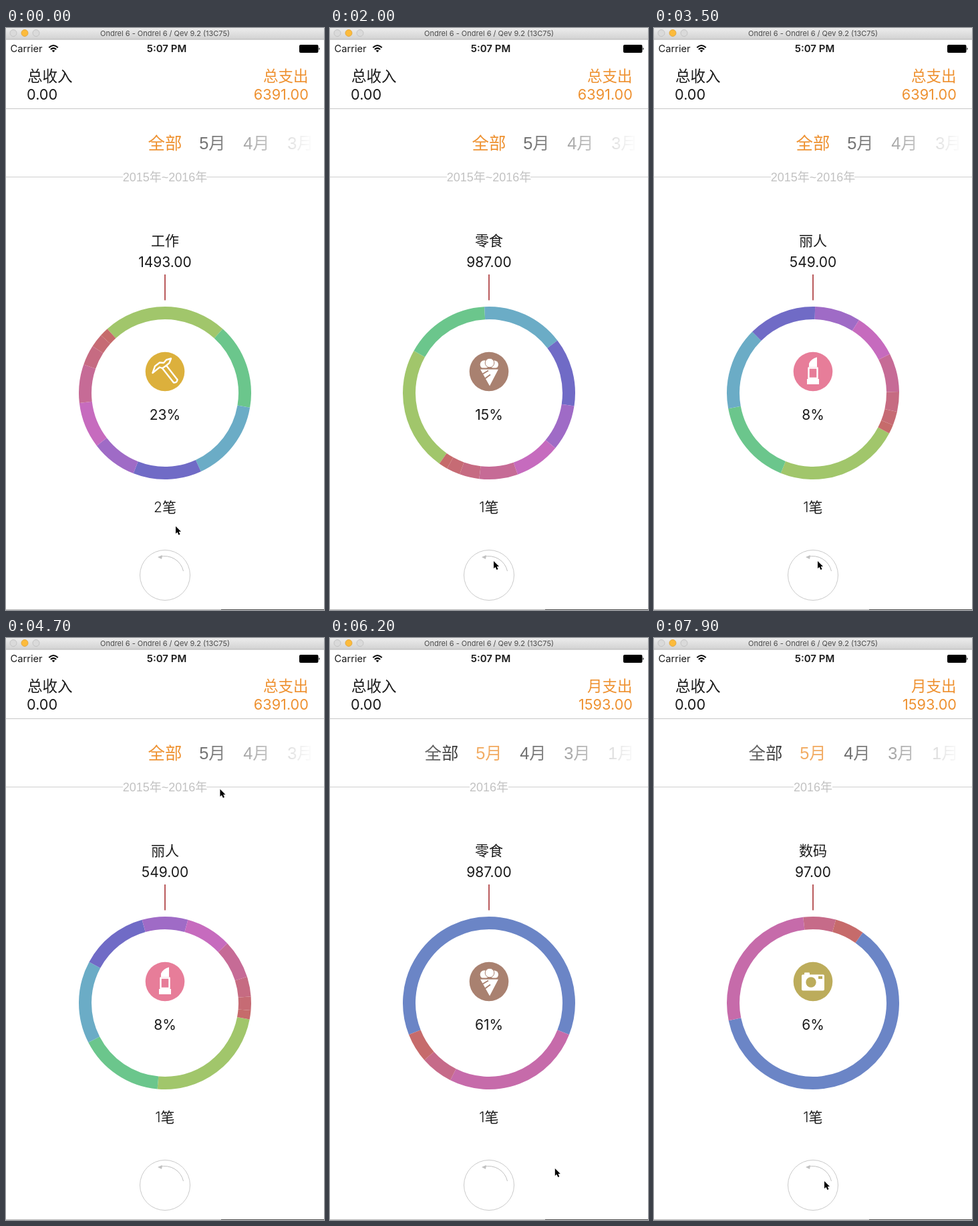
Recreate the animation shown at these times as an HTML page. Size 476 by 869 pixels, loop 8000 ms.

```html
<!DOCTYPE html>
<html lang="zh">
<head>
<meta charset="utf-8">
<title>Expense ring</title>
<style>
html, body { margin: 0; width: 100%; height: 100%; overflow: hidden; background: #fff; }
svg { display: block; width: 100%; height: 100%; }
text { font-family: Inter, "Noto Sans CJK SC", "Noto Sans CJK", sans-serif; fill: #1a1a1a; white-space: pre; }
.mid { text-anchor: middle; }
.end { text-anchor: end; }
.head { font-size: 21.7px; }
.zh { font-size: 22.5px; font-weight: 300; }
.orange { fill: #ee9130; }
.info { font-size: 21px; text-anchor: middle; }
.month, .year { font-family: "Liberation Sans", "Noto Sans CJK SC", "Noto Sans CJK", sans-serif; font-weight: 300; text-anchor: middle; }
.month { font-size: 25.4px; opacity: .75; }
.month:first-child { opacity: 1; }
.year { font-size: 18px; fill: #c2c2c2; }
.white { fill: #fff; }
.hollow { fill: none; stroke: #fff; stroke-width: 2.4; stroke-linejoin: round; stroke-linecap: round; }
</style>
</head>
<body>
<svg viewBox="0 0 476 869" xmlns="http://www.w3.org/2000/svg">
  <defs>
    <linearGradient id="bar" x2="0" y2="1">
      <stop stop-color="#ececec"/><stop offset="1" stop-color="#d2d2d2"/>
    </linearGradient>
    <linearGradient id="fade" gradientUnits="userSpaceOnUse" x1="16" x2="460" y1="0" y2="0">
      <stop stop-color="#fff" stop-opacity="0"/>
      <stop offset=".45" stop-color="#fff"/><stop offset=".55" stop-color="#fff"/>
      <stop offset="1" stop-color="#fff" stop-opacity="0"/>
    </linearGradient>
    <mask id="sides" maskUnits="userSpaceOnUse" x="0" y="140" width="476" height="60">
      <rect x="16" y="140" width="444" height="60" fill="url(#fade)"/>
    </mask>
  </defs>

  <!-- window and status bars -->
  <rect width="476" height="17" fill="url(#bar)"/>
  <path d="M0 17H476" stroke="#b4b4b4"/>
  <g stroke-width=".8">
    <circle cx="11" cy="7.5" r="5" fill="#dadada" stroke="#bcbcbc"/>
    <circle cx="28" cy="7.5" r="5" fill="#fcbb3c" stroke="#dd9f31"/>
    <circle cx="45" cy="7.5" r="5" fill="#dadada" stroke="#bcbcbc"/>
  </g>
  <text class="mid" x="238" y="12" font-size="11" style="fill:#4a4a4a">Ondrel 6 - Ondrel 6 / Qev 9.2 (13C75)</text>
  <text x="6.5" y="36.3" font-size="14.7">Carrier</text>
  <g fill="none" stroke="#000" stroke-width="2">
    <path d="M64.3 29.2Q71 22.8 77.7 29.2M66.8 32Q71 28.2 75.2 32"/>
    <path d="M71 36.3L68.6 33.8Q71 32 73.4 33.8Z" fill="#000" stroke="none"/>
  </g>
  <text class="mid" x="240.5" y="36.3" font-size="15" font-weight="600">5:07 PM</text>
  <rect x="439" y="25" width="28.5" height="12" rx="2"/>
  <path d="M468.4 29q2.4 2 0 4z"/>

  <!-- totals -->
  <text class="zh" x="32" y="80">总收入</text>
  <text class="head" x="31" y="106.5">0.00</text>
  <text class="zh end orange" id="outName" x="452.5" y="80"></text>
  <text class="head end orange" id="outSum" x="453" y="106.5"></text>
  <path d="M0 120.5H476" stroke="#c9c9c9"/>

  <g mask="url(#sides)"><g id="months"></g></g>
  <path id="rule" stroke="#cfcfcf"/>
  <text class="year" id="year" x="238" y="229"></text>

  <!-- chart -->
  <text class="info" id="name" x="238" y="324.8" font-weight="300"></text>
  <text class="info" id="sum" x="238" y="357"></text>
  <path d="M238 368V406.5" stroke="#b2484a" stroke-width="1.8"/>
  <g id="rings" fill="none" stroke-width="19"></g>
  <circle id="disc" cx="238" cy="513" r="29.3"/>
  <g id="icon"></g>
  <text class="info" id="share" x="238" y="584.5"></text>
  <text class="info" id="count" x="238" y="723" font-weight="300"></text>

  <!-- button -->
  <circle id="button" cx="238" cy="817" r="37.5"/>
  <g id="turn">
    <path d="M265.5 811A28.5 28.5 0 0 0 230 789.7" fill="none" stroke="currentColor"/>
    <path d="M227 790l7-3-1 6z" fill="currentColor"/>
  </g>

  <path d="M0 868.5H322" stroke="#b5b5b5"/>
  <path d="M322 868.5H476" stroke="#4a4a4a"/>
  <path id="cursor" d="M0 0V11L2.5 8.8 4.5 13 6.5 12.1 4.7 8H8Z" stroke="#fff" paint-order="stroke"/>
</svg>

<script>
const LOOP = 8000, SWITCH = 5200, TURN = 345, CX = 238, CY = 545, R = 119.5;
const $ = id => document.getElementById(id);

const icons = {
  pick: ['#dcb03c', `<g class="hollow"><path d="M219.5 515L223 505 230 499.5 236 500 240 495.5 247 493.5 244.5 500 240 504 234 508 230 506.5Z"/>
    <path d="M234 508L251 529.5Q256 530 256.5 525L240 504"/></g>`],
  bowl: ['#7fb2a0', '<path class="white" d="M221 511H255Q254 526 244 529H232Q222 526 221 511Z"/>'],
  cone: ['#a98170', `<g class="white"><circle cx="231" cy="502.5" r="6.3"/><circle cx="246" cy="502.5" r="6"/>
    <circle cx="239" cy="500" r="6.8" stroke="#a98170"/><path d="M225 509.5H252L239 534.5Z"/></g>
    <path d="M224 508.5H253M226 518L237 511.5M230 525L240 517.5" stroke="#a98170" stroke-width="2"/>`],
  bag: ['#d39a63', '<path class="white" d="M224 506H252L254 529H222Z"/><path class="hollow" d="M231 506Q231 497 238 497T245 506"/>'],
  lipstick: ['#e77d99', `<g class="white"><path d="M232 506V501Q235 494 244 491.5V506Z"/><path d="M229 524H247V532H229Z"/></g>
    <path class="hollow" d="M231.5 507.5H244.5V523H231.5Z"/>`],
  camera: ['#bcac5b', `<g class="white"><rect x="221" y="502.5" width="34" height="24" rx="2"/><rect x="225" y="499.5" width="8" height="5" rx="1"/></g>
    <g fill="#bcac5b"><circle cx="235" cy="514" r="7.7"/><rect x="246" y="505" width="6" height="4"/></g>`]
};

const sets = [
  { out: '总支出', year: '2015年~2016年', gap: [175, 300],
    values: [1493, 1024, 987, 820, 549, 548, 461, 238, 164, 107],
    items: [['工作', 'pick', 2], ['餐饮', 'bowl', 2], ['零食', 'cone', 1], ['购物', 'bag', 1], ['丽人', 'lipstick', 1]] },
  { out: '月支出', year: '2016年', gap: [209, 267],
    values: [987, 421, 97, 88],
    items: [['零食', 'cone', 1], ['餐饮', 'bowl', 1], ['数码', 'camera', 1]] }
];

// press time, release time, head start of the turn
const taps = [[800, 1200, 86], [1800, 1900, 86], [2500, 2600, 86],
  [3300, 3500, 186], [6700, 6900, 186], [7600, 7700, 86]];

// time, x, y of the pointer
const track = [[250, 254, 744], [600, 245, 796], [3750, 245, 796], [4300, 441, 456],
  [4700, 320.5, 226], [4900, 308, 178], [5500, 308, 178], [6000, 354, 640],
  [6200, 337, 792], [6600, 255, 811]];

const point = deg => {
  const a = deg * Math.PI / 180;
  return (CX + R * Math.sin(a)).toFixed(2) + ' ' + (CY - R * Math.cos(a)).toFixed(2);
};

for (const set of sets) {
  set.total = set.values.reduce((a, b) => a + b);
  set.mids = [];
  let from = 0, arcs = '';
  for (const v of set.values) {
    const to = from + v / set.total * 360;
    set.mids.push((from + to) / 2);
    arcs += `<path d="M${point(from)}A${R} ${R} 0 ${to - from > 180 ? 1 : 0} 1 ${point(to)}" stroke="hsl(${to % 360},44.4%,59.8%)"/>`;
    from = to;
  }
  set.ring = document.createElementNS('http://www.w3.org/2000/svg', 'g');
  set.ring.innerHTML = arcs;
  $('rings').append(set.ring);
}

$('months').innerHTML = ['全部', '5月', '4月', '3月', '1月', '12月']
  .map((m, i) => `<text class="month" x="${CX + (i ? 5 + 66 * i : 0)}" y="180.5">${m}</text>`).join('');
const months = [...$('months').children];

const clamp = x => Math.min(1, Math.max(0, x));
const ease = x => { x = clamp(x); return x * x * (3 - 2 * x); };
const money = v => v.toFixed(2);

function pointer(t) {
  const i = track.findIndex(k => k[0] > t);
  if (i === 0) return track[0].slice(1);
  if (i < 0) return track[track.length - 1].slice(1);
  const [t0, x0, y0] = track[i - 1], [t1, x1, y1] = track[i];
  const p = (t - t0) / (t1 - t0);
  return [x0 + (x1 - x0) * p, y0 + (y1 - y0) * p];
}

let shown = '';
function fill(n, i) {
  if (shown === n + '/' + i) return;
  shown = n + '/' + i;
  const set = sets[n], [name, icon, count] = set.items[i], v = set.values[i];
  $('outName').textContent = set.out;
  $('outSum').textContent = money(set.total);
  $('year').textContent = set.year;
  $('rule').setAttribute('d', `M0 222.5H${set.gap[0]}M${set.gap[1]} 222.5H476`);
  $('name').textContent = name;
  $('sum').textContent = money(v);
  $('share').textContent = Math.floor(v / set.total * 100) + '%';
  $('count').textContent = count + '笔';
  $('disc').setAttribute('fill', icons[icon][0]);
  $('icon').innerHTML = icons[icon][1];
  sets.forEach((s, k) => s.ring.setAttribute('visibility', k === n ? 'visible' : 'hidden'));
  months.forEach((m, k) => m.classList.toggle('orange', k === n));
}

function draw(t) {
  const n = t < SWITCH ? 0 : 1;
  const done = taps.filter(([, up]) => up <= t && (up > SWITCH) === (n === 1));
  const i = done.length, mids = sets[n].mids;
  fill(n, i);

  let turn = mids[i];
  if (i) {
    const [, up, lead] = done[i - 1];
    turn = mids[i - 1] + (mids[i] - mids[i - 1]) * ease((t - up + lead) / TURN);
  }
  sets[n].ring.setAttribute('transform', `rotate(${-turn} ${CX} ${CY})`);

  $('months').setAttribute('transform', `translate(${-71 * ease((t - SWITCH + 50) / 350)} 0)`);

  const down = taps.some(([a, b]) => t >= a && t < b);
  $('button').setAttribute('fill', down ? '#919191' : '#fff');
  $('button').setAttribute('stroke', down ? '#858585' : '#cacaca');
  $('turn').setAttribute('color', down ? '#6c6c6c' : '#c0c0c0');

  $('cursor').setAttribute('transform', `translate(${pointer(t)})`);
}

const start = performance.now();
function tick() {
  draw((performance.now() - start) % LOOP);
  requestAnimationFrame(tick);
}
tick();
</script>
</body>
</html>
```
